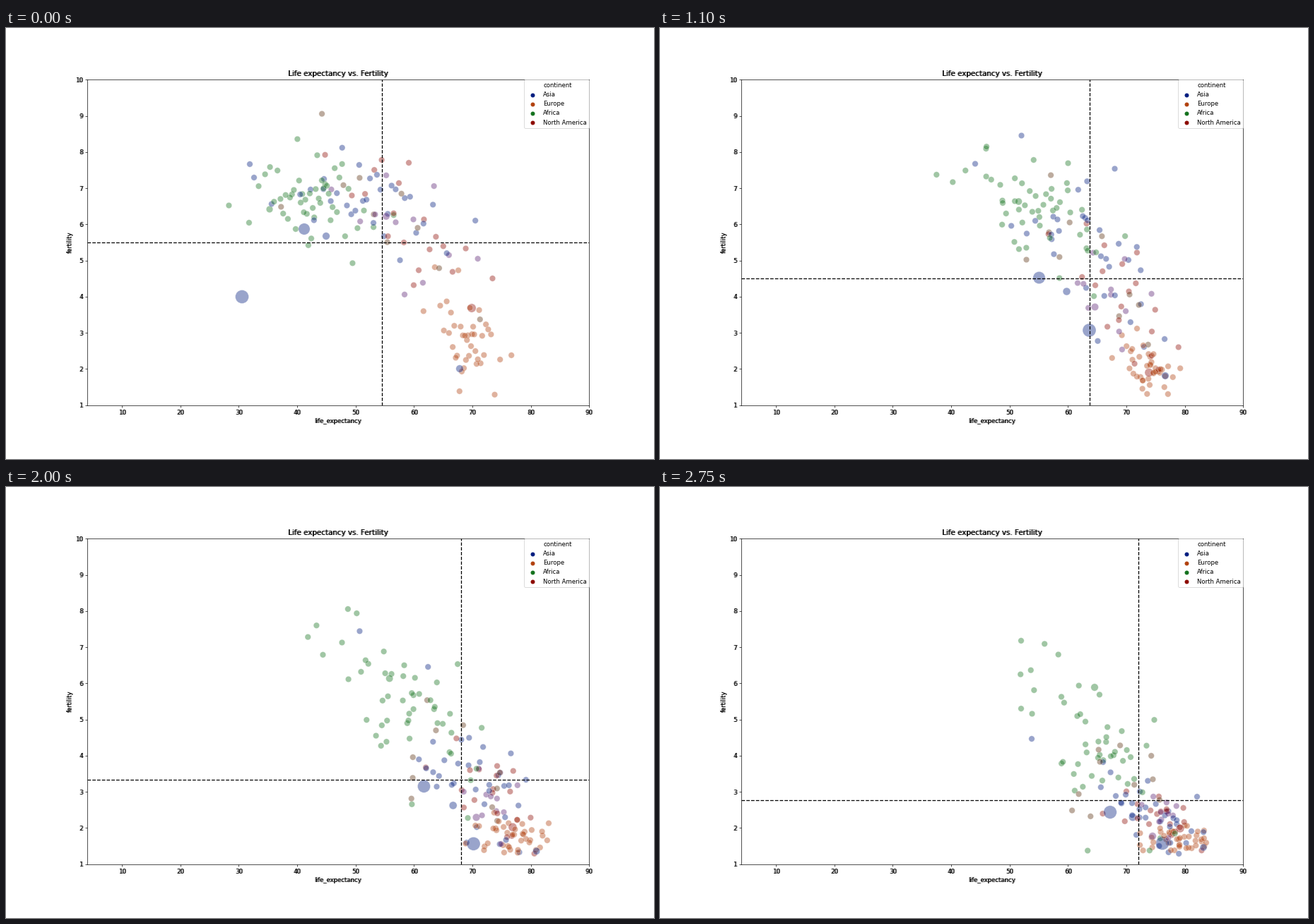
These frames come from a looping animation (917 by 611 pixels, 2.8 s). A matplotlib script:

```python
import numpy as np
import matplotlib.pyplot as plt
from matplotlib.animation import FuncAnimation

W, H, DPI = 917, 611, 61.13
FRAMES, STEP = 56, 50
T = np.arange(FRAMES)
KEYS = [0, 7, 15, 29, 36, 45, 55]
POSES = [0, 15, 29, 45, 55]
XLIM, YLIM = (4, 90), (1, 10)
BOX = np.array([0.125, 0.125, 0.775, 0.755])  # left, bottom, width, height

BLUE, ORANGE, GREEN = "#001c7f", "#b1400d", "#12711c"
RED, PURPLE, BROWN = "#8c0800", "#591e71", "#592f0d"

rng = np.random.default_rng(11)
dots = []  # (colour, path over all frames, size over all frames)


def to_data(px):
    """Stage pixels (y down) to axis values."""
    x = (px[..., 0] / W - BOX[0]) / BOX[2]
    y = (1 - px[..., 1] / H - BOX[1]) / BOX[3]
    return np.stack([XLIM[0] + x * (XLIM[1] - XLIM[0]),
                     YLIM[0] + y * (YLIM[1] - YLIM[0])], axis=-1)


def tween(frames, rows):
    rows = np.asarray(rows, float)
    return np.column_stack([np.interp(T, frames, col) for col in rows.T])


def big(color, sizes, *points, frames=KEYS):
    """One dot with its own path and a steadily changing area."""
    dots.append((color, tween(frames, points), np.linspace(*sizes, FRAMES)))


def spread(n):
    """Evenly filled bell-shaped offsets in random order, unit deviation."""
    p = (np.arange(n) + 0.5) / n
    z = np.log(p / (1 - p))
    return rng.permutation(z / z.std())


def ceiling(v, top, soft=5):
    return top - soft * np.logaddexp(0, (top - v) / soft)


def cloud(color, n, *poses):
    """n dots in a slanted cloud; a pose is centre x, y, spread x, y, slant."""
    cx, cy, sx, sy, slant = tween(POSES, poses).T
    turn = 0.9 * T / FRAMES
    rest = np.sqrt(1 - slant ** 2)
    for a, b, c, d in zip(*(spread(n) for _ in range(4))):
        u = a * np.cos(turn) + b * np.sin(turn)
        v = c * np.cos(turn) + d * np.sin(turn)
        x = ceiling(cx + sx * u, 773)
        y = ceiling(cy + sy * (slant * u + rest * v), 520)
        dots.append((color, np.column_stack([x, y]), np.full(FRAMES, 100.0)))


cloud(GREEN, 49, (432, 244, 45, 33, 0.1), (507, 242, 54, 32, 0.15),
      (555, 268, 55, 55, 0.8), (565, 322, 60, 66, 0.5), (613, 365, 53, 68, 0.6))
cloud(BLUE, 29, (520, 250, 62, 33, 0.3), (592, 278, 58, 60, 0.5),
      (637, 370, 43, 68, 0.7), (678, 450, 40, 42, 0.4), (698, 468, 36, 35, 0.7))
cloud(ORANGE, 40, (653, 440, 25, 40, 0.5), (683, 475, 18, 25, 0.4),
      (698, 488, 22, 21, 0.3), (725, 499, 31, 18, -0.3), (734, 500, 27, 13, -0.2))
cloud(RED, 19, (570, 275, 56, 60, 0.75), (640, 355, 43, 72, 0.75),
      (668, 410, 41, 52, 0.7), (695, 450, 34, 38, 0.6), (705, 468, 32, 19, 0.5))
cloud(PURPLE, 11, (564, 285, 56, 66, 0.65), (610, 345, 40, 50, 0.7),
      (663, 415, 28, 38, 0.3), (700, 455, 22, 28, 0.4), (712, 462, 16, 17, 0.5))
cloud(BROWN, 10, (530, 265, 78, 72, 0.75), (590, 320, 62, 72, 0.8),
      (625, 350, 52, 68, 0.8), (640, 420, 50, 52, 0.5), (645, 415, 42, 33, 0.1))

# The most populous places
big(BLUE, (500, 500), (334, 381), (370, 418), (490, 283), (515, 206), (530, 267),
    (551, 317), (584, 402), (631, 455), (650, 504), (676, 508), (711, 505),
    frames=[0, 1, 2, 3, 4, 7, 15, 29, 36, 45, 55])
big(BLUE, (370, 480), (422, 285), (466, 294), (513, 325), (560, 383),
    (579, 411), (607, 441), (637, 461))
big(BLUE, (153, 175), (453, 295), (499, 300), (545, 327), (606, 420),
    (630, 451), (636, 452), (669, 468))
big(BLUE, (156, 137), (642, 483), (671, 482), (696, 483), (734, 503),
    (744, 514), (759, 519), (769, 511))
big(RED, (212, 193), (659, 397), (666, 455), (682, 494), (702, 483),
    (712, 484), (723, 480), (736, 484))
big(PURPLE, (143, 160), (538, 267), (565, 304), (592, 355), (639, 436),
    (654, 459), (680, 480), (697, 495))
big(GREEN, (127, 152), (373, 257), (398, 260), (487, 242), (528, 250),
    (536, 267), (551, 277), (615, 284))

# Small places that stray far from the crowd
big(BLUE, (100, 100), (345, 193), (376, 193), (409, 193), (483, 192),
    (492, 183), (511, 231), (526, 357))
big(BLUE, (100, 100), (351, 212), (404, 203), (462, 171), (561, 134),
    (583, 211), (615, 310), (627, 390))
big(BLUE, (100, 100), (450, 214), (534, 197), (616, 196), (671, 203),
    (694, 331), (740, 436), (760, 439))
big(BLUE, (100, 100), (431, 229), (481, 231), (430, 262), (261, 298), (232, 345),
    (480, 270), (557, 317), (563, 359), (611, 420), (645, 438),
    frames=[0, 7, 12, 15, 17, 20, 29, 36, 45, 55])

means = to_data(tween(KEYS, [(532, 304.5), (559.5, 313), (586, 334), (629, 377),
                             (637, 404), (653, 428), (677, 444)]))

# Mix the draw order so the continents overlap evenly
dots = [dots[i] for i in rng.permutation(len(dots))]
colors = [d[0] for d in dots]
places = to_data(np.array([d[1] for d in dots]))
areas = np.array([d[2] for d in dots])

fig = plt.figure(figsize=((W + 0.01) / DPI, (H + 0.01) / DPI), dpi=DPI, facecolor="white")


def make_axes(dx=0, alpha=1.0):
    ax = fig.add_axes([BOX[0] + dx / W, *BOX[1:]], label=f"axes{dx}")
    ax.set(xlim=XLIM, ylim=YLIM, xticks=range(10, 91, 10), yticks=range(1, 11))
    ax.set_title("Life expectancy vs. Fertility", fontsize=12, alpha=alpha)
    ax.set_xlabel("life_expectancy", alpha=alpha)
    ax.set_ylabel("fertility", alpha=alpha)
    for text in ax.get_xticklabels() + ax.get_yticklabels():
        text.set_alpha(alpha)
    return ax


ax = make_axes()

# A second, slightly shifted copy of the lettering makes it look heavy
ghost = make_axes(dx=1, alpha=0.7)
ghost.patch.set_visible(False)
ghost.spines[:].set_visible(False)
ghost.tick_params(length=0, pad=7)

scatter = ax.scatter(places[:, 0, 0], places[:, 0, 1], s=areas[:, 0], c=colors,
                     alpha=0.4, edgecolors="white", linewidths=0.8)
vline = ax.axvline(means[0, 0], color="black", ls="--", lw=1.5)
hline = ax.axhline(means[0, 1], color="black", ls="--", lw=1.5)

names = ["continent", "Asia", "Europe", "Africa", "North America"]
handles = [ax.scatter([], [], s=36, color=c) for c in ("none", BLUE, ORANGE, GREEN, RED)]
ax.legend(handles, names, loc="upper right", borderaxespad=0, fontsize=10)


def draw(i):
    scatter.set_offsets(places[:, i])
    scatter.set_sizes(areas[:, i])
    vline.set_xdata([means[i, 0]] * 2)
    hline.set_ydata([means[i, 1]] * 2)
    return scatter, vline, hline


anim = FuncAnimation(fig, draw, frames=FRAMES, interval=STEP, repeat=True)
plt.show()
```
